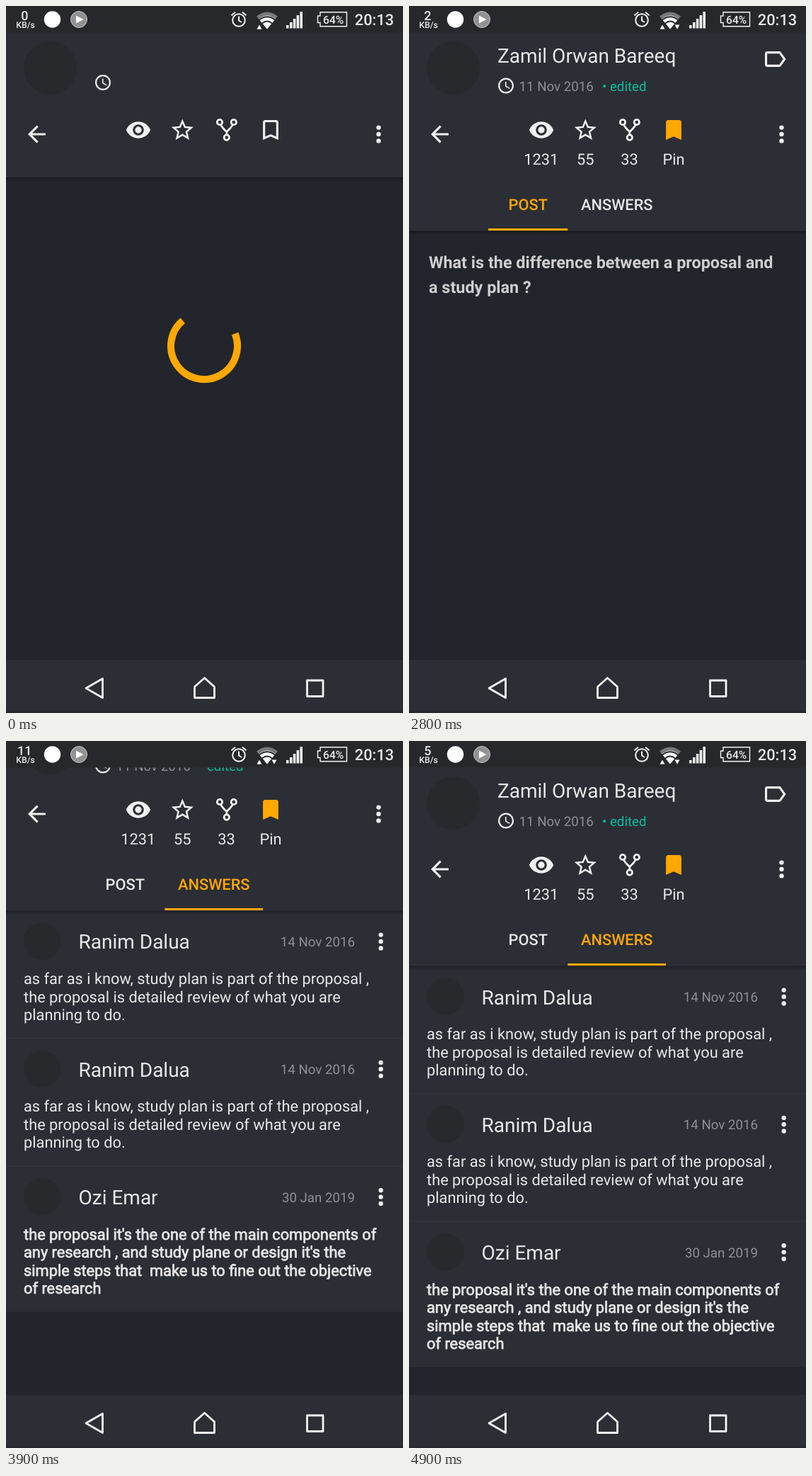
Animation, 561 px wide and 998 px high, one loop 5000 ms. Source, as an HTML page:

```html
<!DOCTYPE html>
<html lang="en">
<head>
<meta charset="utf-8">
<title>Post and answers</title>
<style>
  html, body { margin: 0; width: 100%; height: 100%; overflow: hidden; background: #22252b; }
  svg { display: block; width: 100vw; height: 100vh; }
  text { font-family: Roboto, sans-serif; fill: #e8e8e9; white-space: pre; text-rendering: geometricPrecision; }
  .title { font-size: 28px; }
  .body, .count, .tab { font-size: 21.8px; }
  .date { font-size: 18.7px; fill: #8f9094; }
  .tab, .clock { font-weight: 500; }
  .count, .tab, .rate { text-anchor: middle; }
  .strong { stroke: #e8e8e9; stroke-width: .75px; }
  .ask { font-size: 23.4px; font-weight: 700; fill: #cfcfd0; }
  .icon { fill: #f0f0f0; }
  .line { fill: none; stroke: #f4f4f4; }
</style>
</head>
<body>
<svg viewBox="0 0 561 998" preserveAspectRatio="none">
  <defs>
    <linearGradient id="shade" x2="0" y2="1">
      <stop stop-color="#000" stop-opacity=".3"/>
      <stop offset="1" stop-color="#000" stop-opacity="0"/>
    </linearGradient>
    <g id="more" class="icon">
      <circle cy="-9.4" r="3.2"/><circle r="3.2"/><circle cy="9.4" r="3.2"/>
    </g>
  </defs>
  <rect width="561" height="998" fill="#22252b"/>

  <path id="spinner" fill="none" stroke="#ffa800" stroke-width="10"/>

  <g id="question">
    <text class="ask" x="28" y="370.3">What is the difference between a proposal and</text>
    <text class="ask" x="28" y="404.5">a study plan ?</text>
  </g>
  <g id="answers"></g>

  <g id="header">
    <rect id="bar" y="0" width="561" fill="#2c2e35"/>
    <rect id="shadow" width="561" height="6" fill="url(#shade)"/>
    <circle cx="62.5" cy="87.5" r="37.5" fill="#27292d"/>
    <g id="time" class="icon">
      <path transform="scale(1.1) translate(-12 -12)" d="M12 2a10 10 0 1 0 0 20a10 10 0 1 0 0-20zm0 18a8 8 0 1 1 0-16a8 8 0 1 1 0 16zm.5-13H11v6l5.25 3.15.75-1.23-4.5-2.67z"/>
    </g>
    <g class="icon">
      <path transform="translate(24.8 162.3) scale(1.558)" d="M20 11H7.83l5.59-5.59L12 4l-8 8 8 8 1.41-1.41L7.83 13H20z"/>
      <path transform="translate(168.3 156.3) scale(1.558)" d="M12 4.5C7 4.5 2.73 7.61 1 12c1.73 4.39 6 7.5 11 7.5s9.27-3.11 11-7.5c-1.73-4.39-6-7.5-11-7.5zM12 17a5 5 0 1 1 0-10a5 5 0 1 1 0 10zm0-8a3 3 0 1 0 0 6a3 3 0 1 0 0-6z"/>
      <path transform="translate(230.6 156.3) scale(1.558)" d="M22 9.24l-7.19-.62L12 2 9.19 8.63 2 9.24l5.46 4.73L5.82 21 12 17.27 18.18 21l-1.63-7.03zM12 15.4l-3.76 2.27 1-4.28-3.32-2.88 4.38-.38L12 6.1l1.71 4.04 4.38.38-3.32 2.88 1 4.28z"/>
    </g>
    <g class="line" stroke-width="2.8">
      <circle cx="302" cy="164" r="3.7"/><circle cx="321.8" cy="164" r="3.7"/><circle cx="311.8" cy="185.6" r="3.7"/>
      <path d="M303.5 167.5Q305 171.5 311.8 177.5Q318.5 171.5 320.3 167.5M311.8 176.5V182"/>
    </g>
    <path id="pin" transform="translate(355.3 156.3) scale(1.558)"/>
    <use href="#more" x="526.5" y="181"/>

    <g id="info">
      <text class="title" x="125" y="80.3">Zamil Orwan Bareeq</text>
      <text class="date" x="155.5" y="120.3">11 Nov 2016</text>
      <text class="date" x="273" y="120.3" style="fill:#0dbd9f">• edited</text>
      <path class="icon" transform="translate(498.3 56.3) scale(1.558)" d="M17.63 5.84C17.27 5.33 16.67 5 16 5L5 5.01C3.9 5.01 3 5.9 3 7v10c0 1.1.9 1.99 2 1.99L16 19c.67 0 1.27-.33 1.63-.84L22 12zM16 17H5V7h11l3.55 5z"/>
      <text class="count" x="186.7" y="223.7">1231</text>
      <text class="count" x="249.3" y="223.7">55</text>
      <text class="count" x="311.5" y="223.7">33</text>
      <text class="count" x="374" y="223.7">Pin</text>
    </g>
    <g id="tabs">
      <text id="tabPost" class="tab" x="168.3" y="288.2">POST</text>
      <text id="tabAnswers" class="tab" x="293.7" y="288.2">ANSWERS</text>
      <rect id="marker" y="314" height="3" fill="#ffa800"/>
    </g>
  </g>

  <g id="status">
    <rect width="561" height="37.5" fill="#26282b"/>
    <text id="rate" class="rate" x="26.3" y="20" font-size="18" font-weight="500"></text>
    <text class="rate" x="27.6" y="31.2" font-size="12.3" font-weight="500">KB/s</text>
    <circle cx="65.5" cy="19" r="11.7" fill="#fff"/>
    <circle cx="103" cy="19" r="11.5" fill="#929292" stroke="#c4c4c4"/>
    <path d="M99 13.5L109.5 19L99 24.5z" fill="#fff"/>
    <g class="line" stroke-width="2">
      <circle cx="329" cy="20" r="8.8"/>
      <path d="M329 14.5V20.5L333 23M318.5 13.3L324 8.7M339.5 13.3L334 8.7"/>
    </g>
    <path d="M354 14.5Q369 2.5 384 14.5L369 32.5z" fill="#77797b"/>
    <path d="M357.5 18.5Q369 8.5 380.5 18.5L369 32.5z" fill="#fff"/>
    <path d="M358 19.5Q369 11 380 19.5M362 24.5Q369 18.5 376 24.5" fill="none" stroke="#26282b" stroke-width="1.8"/>
    <path d="M354.5 32.7L358 26.5L361.5 32.7z" fill="#fff"/>
    <path id="down" d="M375.5 26.5L379 32.7L382.5 26.5z" fill="#fff"/>
    <path class="icon" d="M396 27h3.6v4.5H396zM401 23h3.6v8.5H401zM405.8 18h3.6v13.5h-3.6zM410.6 13h3.6v18.5h-3.6zM415.4 8h3.6v23.5h-3.6z"/>
    <path class="line" stroke-width="1.4" d="M444 8.7H481.5V28.7H444V23.5H440.5V14H444z"/>
    <text class="clock" x="462.7" y="24.5" font-size="15.6" text-anchor="middle">64%</text>
    <text class="clock" x="520.5" y="26.8" font-size="21.8" text-anchor="middle">20:13</text>
  </g>

  <rect y="923" width="561" height="75" fill="#2c2e35"/>
  <rect y="995" width="561" height="3" fill="#27292e"/>
  <g class="line" stroke-width="2.8" stroke-linejoin="round">
    <path d="M113 963L136.5 949.5V976.5z"/>
    <path d="M266.5 976.5V961L280.5 948.5L294.5 961V976.5z"/>
    <rect x="425.5" y="952" width="22.5" height="22.5"/>
  </g>
</svg>
<script>
const $ = id => document.getElementById(id);
const LOOP = 5000, WIDTH = 561, FOLD = 203;
const ORANGE = '#ffa800', LIGHT = '#e8e8e9';

const PLAN = [
  'as far as i know, study plan is part of the proposal ,',
  'the proposal is detailed review of what you are',
  'planning to do.'
];
const DESIGN = [
  "the proposal it's the one of the main components of",
  "any research , and study plane or design it's the",
  'simple steps that  make us to fine out the objective',
  'of research'
];
const cards = [
  { name: 'Ranim Dalua', date: '14 Nov 2016', lines: PLAN },
  { name: 'Ranim Dalua', date: '14 Nov 2016', lines: PLAN },
  { name: 'Ozi Emar', date: '30 Jan 2019', lines: DESIGN, strong: true }
];

const card = ({ name, date, lines, strong }, i) => `
  <g transform="translate(0 ${317 + i * 180.3})">
    <rect width="${WIDTH}" height="${104 + lines.length * 25.55}" fill="#2c2e35"/>
    ${i ? `<rect width="${WIDTH}" height="1" fill="#36393f"/>` : ''}
    <circle cx="51.3" cy="43.7" r="26.2" fill="#27292d"/>
    <text class="title" x="102.5" y="54.5">${name}</text>
    <text class="date" x="493" y="51.2" text-anchor="end">${date}</text>
    <use href="#more" x="529.7" y="44"/>
    ${lines.map((s, n) => `<text class="body${strong ? ' strong' : ''}" x="25" y="${104 + n * 25.55}">${s}</text>`).join('')}
  </g>`;
$('answers').innerHTML = cards.map(card).join('');

const set = (id, attrs) => {
  for (const key in attrs) $(id).setAttribute(key, attrs[key]);
};
const show = (id, on) => set(id, { visibility: on ? 'visible' : 'hidden' });
const move = (id, x, y) => set(id, { transform: `translate(${x} ${y})` });
const clamp = v => Math.max(0, Math.min(1, v));
const mix = (a, b, p) => a + (b - a) * p;

// Network speed readings: [from ms, KB/s]
const rates = [[0, 0], [200, 2], [800, 0], [1400, 3], [2200, 0], [2800, 2], [3400, 11], [4100, 0], [4700, 5]];
const rateAt = t => rates.filter(r => r[0] <= t).pop()[1];

const swipeAt = t => 1 - (1 - clamp((t - 3187) / 350)) ** 5;

function foldAt(t) {
  if (t <= 4400) return FOLD * (1 - (1 - clamp((t - 3800) / 600)) ** 2.66);
  return FOLD * (1 - clamp((t - 4400) / 500)) ** 2;
}

function arc(from, to) {
  const at = deg => {
    const a = deg * Math.PI / 180;
    return `${280 + 47 * Math.cos(a)} ${480 + 47 * Math.sin(a)}`;
  };
  return `M${at(from)}A47 47 0 ${to - from > 180 ? 1 : 0} 1 ${at(to)}`;
}

const PIN_FULL = 'M17 3H7c-1.1 0-1.99.9-1.99 2L5 21l7-3 7 3V5c0-1.1-.9-2-2-2z';
const PIN_OPEN = PIN_FULL + 'm0 15l-5-2.18L7 18V5h10z';

function draw(t) {
  const loaded = t >= 400, tabbed = t >= 1600;
  const swipe = swipeAt(t), fold = foldAt(t), height = tabbed ? 317.5 : 242;
  const answers = t >= 3200;

  const turn = t * .165;
  const chase = 250 * clamp(t / 666) ** 2;
  set('spinner', { d: arc(-22 + turn + chase, 230 + turn) });
  show('spinner', !loaded);

  show('info', loaded);
  move('time', 137, loaded ? 112.5 : 108);
  set('pin', { d: loaded ? PIN_FULL : PIN_OPEN, fill: loaded ? ORANGE : '#f0f0f0' });
  show('down', t >= 100);

  show('tabs', tabbed);
  set('bar', { height });
  set('shadow', { y: height });
  const left = mix(112, 224.3, swipe);
  set('marker', { x: left, width: mix(224.3, 363, swipe) - left });
  $('tabPost').style.fill = answers ? LIGHT : ORANGE;
  $('tabAnswers').style.fill = answers ? ORANGE : LIGHT;

  set('question', { opacity: t < 2500 ? 0 : t < 2600 ? .5 : 1 });
  move('question', -WIDTH * swipe, -fold);
  show('question', swipe < 1);
  move('answers', WIDTH * (1 - swipe), -fold);
  show('answers', answers);
  move('header', 0, -fold);

  $('rate').textContent = rateAt(t);
}

// The screen refreshes ten times a second.
function tick() {
  draw(Math.floor(performance.now() % LOOP / 100) * 100);
  requestAnimationFrame(tick);
}
tick();
</script>
</body>
</html>
```
